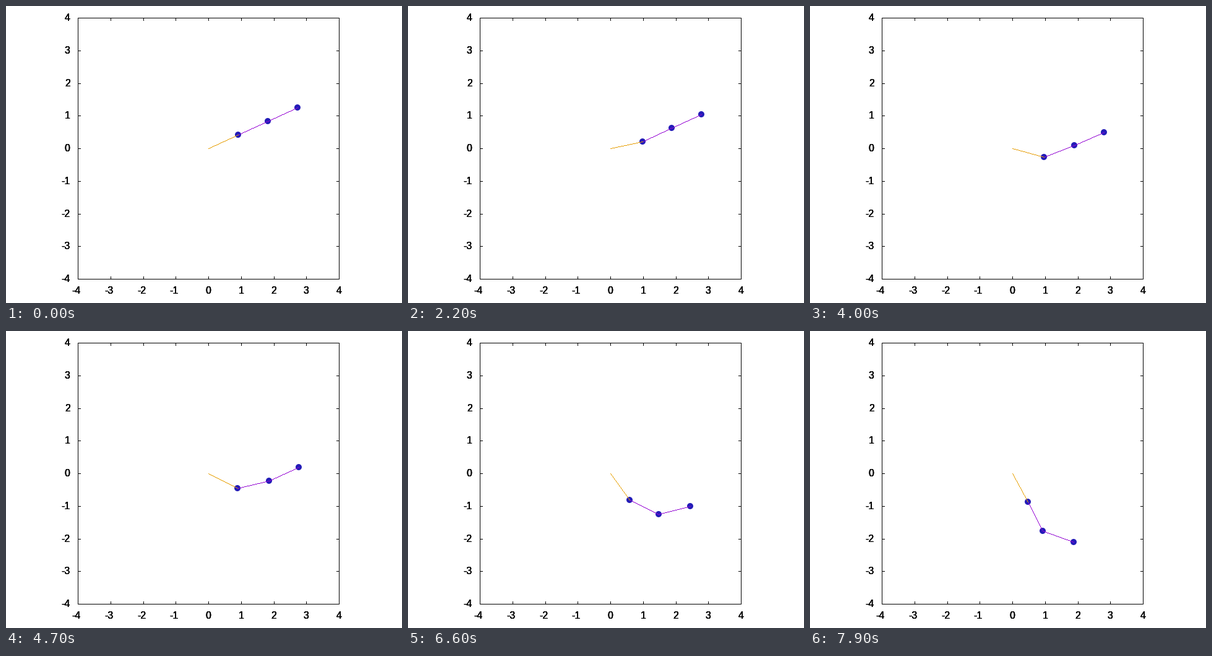
Write a matplotlib script that moves like this. It is 640 px wide and 480 px high and loops after 8 s.

```python
import numpy as np
import matplotlib.pyplot as plt
from matplotlib.animation import FuncAnimation
from matplotlib.collections import PolyCollection
from matplotlib.patches import Circle

W, H, DPI = 640, 480, 100
PX = 72 / DPI                      # one pixel in points
LEFT, TOP, SIDE = 116, 19, 422     # plot box in pixels
FRAMES, STEP_MS = 80, 100
G, DT, SUB = 9.8, 0.01, 10         # gravity, time per frame, substeps

PURPLE, ORANGE, BLUE = "#9400d3", "#e69f00", "#241cb8"


def to_px(x, y):
    """Plot units to whole pixel columns and rows."""
    s = SIDE / 8
    col = np.floor(LEFT + (np.asarray(x) + 4) * s + 0.5)
    row = np.floor(TOP + (4 - np.asarray(y)) * s + 0.5)
    return col, row


# Triple pendulum: unit rods, unit masses, angles measured from straight down
LOAD = np.array([[3, 2, 1], [2, 2, 1], [1, 1, 1]], float)


def deriv(state):
    th, om = state
    d = th[:, None] - th[None, :]
    force = -(LOAD * np.sin(d)) @ om**2 - G * np.diag(LOAD) * np.sin(th)
    return np.array([om, np.linalg.solve(LOAD * np.cos(d), force)])


def rk4(s, h):
    a = deriv(s)
    b = deriv(s + h / 2 * a)
    c = deriv(s + h / 2 * b)
    d = deriv(s + h * c)
    return s + h / 6 * (a + 2 * b + 2 * c + d)


def simulate():
    s = np.array([[2.0] * 3, [0.0] * 3])
    poses = []
    for _ in range(FRAMES):
        poses.append(s[0].copy())
        for _ in range(SUB):
            s = rk4(s, DT / SUB)
    return poses


def cells(xs, ys):
    """Unit squares of a stepped, one-pixel-wide polyline."""
    squares = []
    for xa, ya, xb, yb in zip(xs, ys, xs[1:], ys[1:]):
        n = int(max(abs(xb - xa), abs(yb - ya))) + 1
        cols = np.floor(np.linspace(xa, xb, n) + 0.5)
        rows = np.floor(np.linspace(ya, yb, n) + 0.5)
        squares += [[(c, r), (c + 1, r), (c + 1, r + 1), (c, r + 1)]
                    for c, r in zip(cols, rows)]
    return squares


poses = simulate()

fig = plt.figure(figsize=(W / DPI, H / DPI), dpi=DPI, facecolor="white")
ax = fig.add_axes([0, 0, 1, 1])
ax.set_xlim(0, W)
ax.set_ylim(H, 0)
ax.axis("off")


def pixel_line(color, z):
    return ax.add_collection(
        PolyCollection([], facecolors=color, linewidths=0, zorder=z),
        autolim=False)


def label(x, y, text, ha):
    # repeated drawing thickens the smooth edges
    for _ in range(4):
        ax.text(x, y, text, ha=ha, va="baseline", color="black",
                family="Liberation Sans", fontsize=16 * PX)


x0, x1, y0, y1 = LEFT, LEFT + SIDE, TOP, TOP + SIDE
grid = cells([x0, x1, x1, x0, x0], [y0, y0, y1, y1, y0])
for v in range(-4, 5):
    tx, ty = to_px(v, v)
    for edge, inner in ((y0, y0 + 4), (y1, y1 - 4)):
        grid += cells([tx, tx], [edge, inner])
    for edge, inner in ((x0, x0 + 4), (x1, x1 - 4)):
        grid += cells([edge, inner], [ty, ty])
    label(tx - (2.5 if v < 0 else 0), 465, str(v), "center")
    label(103.5, ty + 5, str(v), "right")
pixel_line("black", 1).set_verts(grid)

bobs = [ax.add_patch(Circle((0, 0), 5, fc=BLUE, ec="none", zorder=3))
        for _ in range(3)]
chain = pixel_line(PURPLE, 4)
arm = pixel_line(ORANGE, 5)


def draw(i):
    th = poses[i]
    xs, ys = to_px(np.append(0, np.cumsum(np.sin(th))),
                   np.append(0, -np.cumsum(np.cos(th))))
    arm.set_verts(cells(xs[:2], ys[:2]))
    chain.set_verts(cells(xs[1:], ys[1:]))
    for bob, x, y in zip(bobs, xs[1:], ys[1:]):
        bob.center = (x, y)
    return [*bobs, chain, arm]


anim = FuncAnimation(fig, draw, frames=FRAMES, interval=STEP_MS,
                     repeat=True, repeat_delay=0, blit=False)
plt.show()
```
